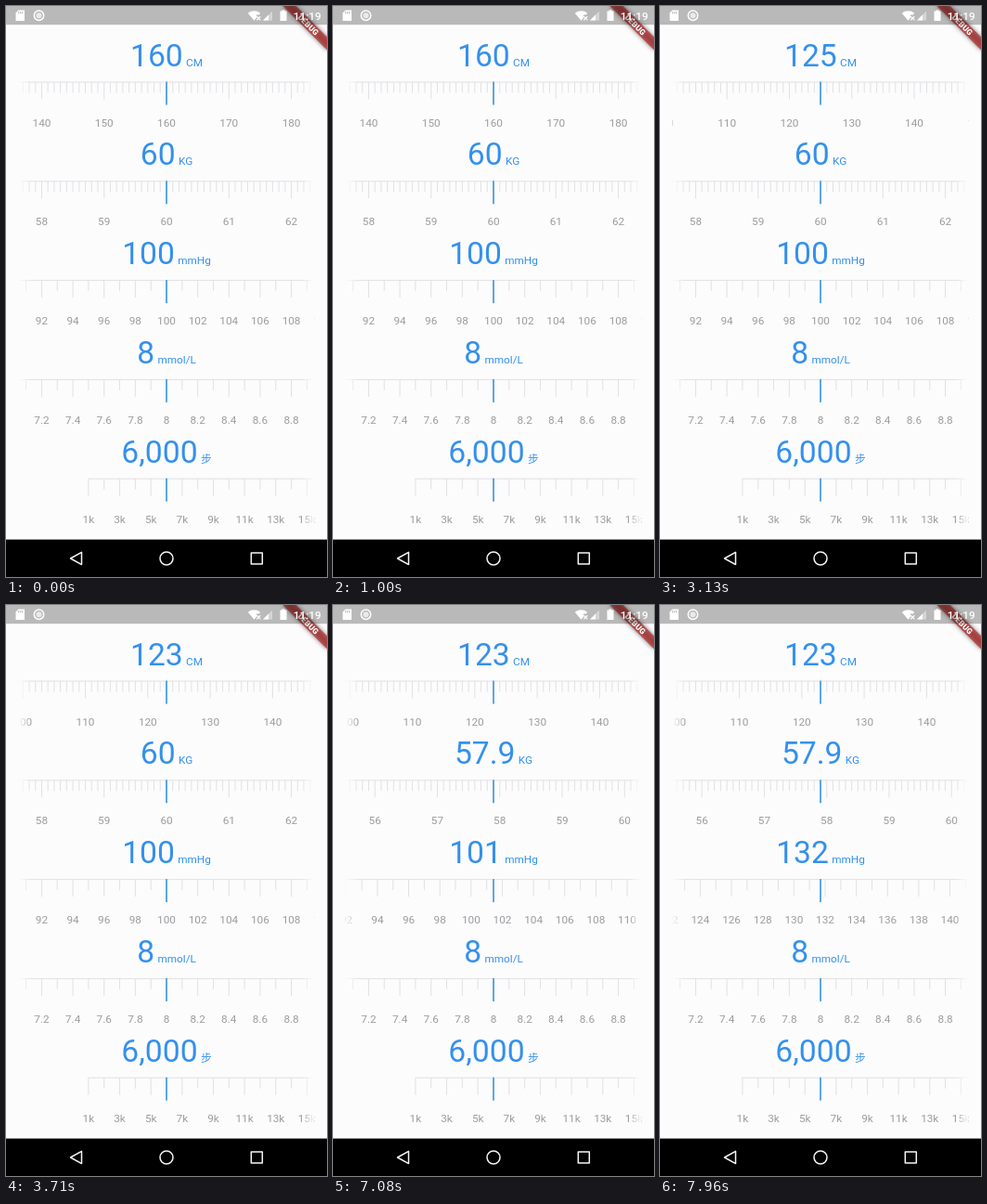
These frames come from a looping animation (346x615 px, 8000 ms). An HTML page with a canvas:

```html
<!DOCTYPE html>
<html lang="en">
<head>
<meta charset="utf-8">
<title>Ruler pickers</title>
<style>
html, body { margin: 0; width: 100%; height: 100%; overflow: hidden; background: #fcfcfd; }
canvas { display: block; width: 346px; height: 615px; }
</style>
</head>
<body>
<canvas id="stage"></canvas>
<script>
const W = 346, H = 615, LOOP = 8000;
const DP = W / 411.43;           // layout unit to pixels
const MID = W / 2, PAD = 16 * DP;
const FONT = 'Roboto, "Noto Sans CJK SC", "Noto Sans CJK", sans-serif';
const BG = '#fcfcfd', BLUE = '#3490ec', LABEL = '#9c9ca0', TICK = '#e1e1e4', POINTER = '#3f98de';

const canvas = document.getElementById('stage');
const ctx = canvas.getContext('2d');
const ratio = window.devicePixelRatio || 1;
canvas.width = W * ratio;
canvas.height = H * ratio;

const plain = v => String(Math.round(v * 10) / 10);
const thousands = v => Math.round(v).toLocaleString('en-US');

// step: value per tick; every: ticks per label; gap: pixels per tick
const rulers = [
  { unit: 'CM', step: 1, every: 10, gap: 8 * DP, from: 160, to: 123, start: 1400, end: 3414, min: 0 },
  { unit: 'KG', step: 0.1, every: 10, gap: 8 * DP, from: 60, to: 57.9, start: 4000, end: 5200, min: 0 },
  { unit: 'mmHg', step: 1, every: 2, gap: 20 * DP, from: 100, to: 132, start: 6943, end: 8022, min: 0 },
  { unit: 'mmol/L', step: 0.1, every: 2, gap: 20 * DP, from: 8, min: 0 },
  { unit: '步', step: 1000, every: 2, gap: 20 * DP, from: 6000, min: 1000,
    format: thousands, label: v => Math.round(v / 1000) + 'k' }
];

function valueAt(r, t) {
  if (r.to === undefined) return r.from;
  const s = Math.min(1, Math.max(0, (t - r.start) / (r.end - r.start)));
  return r.from + (r.to - r.from) * s * s * (3 - 2 * s);
}

function text(str, x, y, size, color, align = 'left', weight = 400) {
  ctx.font = `${weight} ${size}px ${FONT}`;
  ctx.fillStyle = color;
  ctx.textAlign = align;
  ctx.fillText(str, x, y);
}

function textWidth(str, size) {
  ctx.font = `400 ${size}px ${FONT}`;
  return ctx.measureText(str).width;
}

function polygon(points, color, stroke) {
  ctx.beginPath();
  points.forEach(([x, y]) => ctx.lineTo(x, y));
  ctx.closePath();
  if (stroke) {
    ctx.strokeStyle = color;
    ctx.lineWidth = stroke;
    ctx.stroke();
  } else {
    ctx.fillStyle = color;
    ctx.fill();
  }
}

function fade(x0, x1, y) {
  const g = ctx.createLinearGradient(x0, 0, x1, 0);
  g.addColorStop(0, BG);
  g.addColorStop(1, 'rgba(252,252,253,0)');
  ctx.fillStyle = g;
  ctx.fillRect(Math.min(x0, x1), y - 2, Math.abs(x1 - x0), 56);
}

function drawReading(r, value, y) {
  const big = 40 * DP, small = 14 * DP, gap = 4 * DP;
  const str = (r.format || plain)(Math.round(value / r.step) * r.step);
  const w = textWidth(str, big);
  const x = MID - (w + gap + textWidth(r.unit, small)) / 2;
  text(str, x, y, big, BLUE);
  text(r.unit, x + w + gap, y, small, BLUE);
}

function drawRuler(r, value, y) {
  const left = PAD, right = W - PAD;
  const pos = value / r.step, first = Math.round(r.min / r.step);
  const at = i => MID + (i - pos) * r.gap;
  const lo = Math.max(first, Math.floor(pos - MID / r.gap) - 2);
  const hi = Math.ceil(pos + MID / r.gap) + 2;

  ctx.save();
  ctx.beginPath();
  ctx.rect(left, y - 2, right - left, 56);
  ctx.clip();
  const lineStart = Math.max(left, at(first) - 0.5);
  ctx.fillStyle = TICK;
  ctx.fillRect(lineStart, y - 0.5, right - lineStart, 1);
  for (let i = lo; i <= hi; i++) {
    const major = (i - first) % r.every === 0;
    ctx.fillStyle = TICK;
    ctx.fillRect(at(i) - 0.5, y, 1, major ? 18.5 : 11.5);
    if (major) text((r.label || plain)(i * r.step), at(i), y + 47.6, 14 * DP, LABEL, 'center');
  }
  fade(left, left + 14, y);
  fade(right, right - 14, y);
  ctx.restore();

  ctx.fillStyle = POINTER;
  ctx.fillRect(MID - DP, y - 0.5, 2 * DP, 25);
}

function drawRibbon() {
  const w = 80 * DP, h = 12 * DP, top = 28 * DP;
  ctx.save();
  ctx.translate(W, 0);
  ctx.rotate(Math.PI / 4);
  ctx.save();
  ctx.filter = 'blur(2.5px)';
  ctx.fillStyle = 'rgba(0,0,0,0.5)';
  ctx.fillRect(-w / 2, top, w, h);
  ctx.restore();
  ctx.fillStyle = 'rgba(183,28,28,0.63)';
  ctx.fillRect(-w / 2, top, w, h);
  text('DEBUG', 0, top + h / 2 + 3.05, 10.2 * DP, '#fff', 'center', 900);
  ctx.restore();
}

function drawStatusBar() {
  ctx.fillStyle = 'rgba(8,4,0,0.27)';
  ctx.fillRect(0, 0, W, 24 * DP);

  // memory card
  polygon([[13.5, 4.5], [20, 4.5], [20, 16], [10.5, 16], [10.5, 7.5]], '#fff');
  ctx.fillStyle = '#bab8b6';
  for (let i = 0; i < 3; i++) ctx.fillRect(13.2 + i * 2, 6, 1, 2.4);

  // ring with a soft centre
  ctx.beginPath();
  ctx.arc(35.5, 10.2, 5.2, 0, 7);
  ctx.strokeStyle = '#fff';
  ctx.lineWidth = 1.5;
  ctx.stroke();
  ctx.beginPath();
  ctx.arc(35.5, 10.2, 3, 0, 7);
  ctx.fillStyle = 'rgba(255,255,255,0.7)';
  ctx.fill();

  // wireless fan, lower right cut away for a small cross
  ctx.save();
  ctx.beginPath();
  ctx.rect(258, 3, 12, 14);
  ctx.rect(270, 3, 6, 6.5);
  ctx.clip();
  ctx.beginPath();
  ctx.moveTo(267.5, 15.8);
  ctx.arc(267.5, 15.8, 10.6, -Math.PI * 0.72, -Math.PI * 0.28);
  ctx.closePath();
  ctx.fillStyle = '#fff';
  ctx.fill();
  ctx.restore();
  polygon([[270.5, 11.5], [274, 15]], '#fff', 1.1);
  polygon([[274, 11.5], [270.5, 15]], '#fff', 1.1);

  // signal
  polygon([[277, 15.5], [287, 15.5], [287, 5.5]], 'rgba(255,255,255,0.4)');
  polygon([[277, 15.5], [283, 15.5], [283, 9.5]], '#fff');

  // battery
  ctx.fillStyle = '#fff';
  ctx.fillRect(295.5, 5.5, 7, 10.5);
  ctx.fillRect(297.5, 4.3, 3, 1.5);

  text('11:19', 339.7, 14.6, 14 * DP, '#fff', 'right', 500);
}

function drawNavBar() {
  const y = 595, white = '#f6f6f6';
  ctx.fillStyle = '#000';
  ctx.fillRect(0, H - 48 * DP, W, 48 * DP);
  ctx.lineJoin = 'round';
  polygon([[69.5, y], [81.5, y - 6.6], [81.5, y + 6.6]], white, 1.5);
  ctx.beginPath();
  ctx.arc(MID, y, 7, 0, 7);
  ctx.stroke();
  ctx.strokeRect(264.3, y - 6, 12, 12);
}

function draw(t) {
  ctx.setTransform(ratio, 0, 0, ratio, 0, 0);
  ctx.fillStyle = BG;
  ctx.fillRect(0, 0, W, H);
  rulers.forEach((r, i) => {
    const y = i * 127 * DP;
    const value = valueAt(r, t);
    drawReading(r, value, y + 64.6);
    drawRuler(r, value, y + 82);
  });
  drawRibbon();
  drawStatusBar();
  drawNavBar();
}

const begin = performance.now();
function frame() {
  draw((performance.now() - begin) % LOOP);
  requestAnimationFrame(frame);
}
frame();
</script>
</body>
</html>
```
